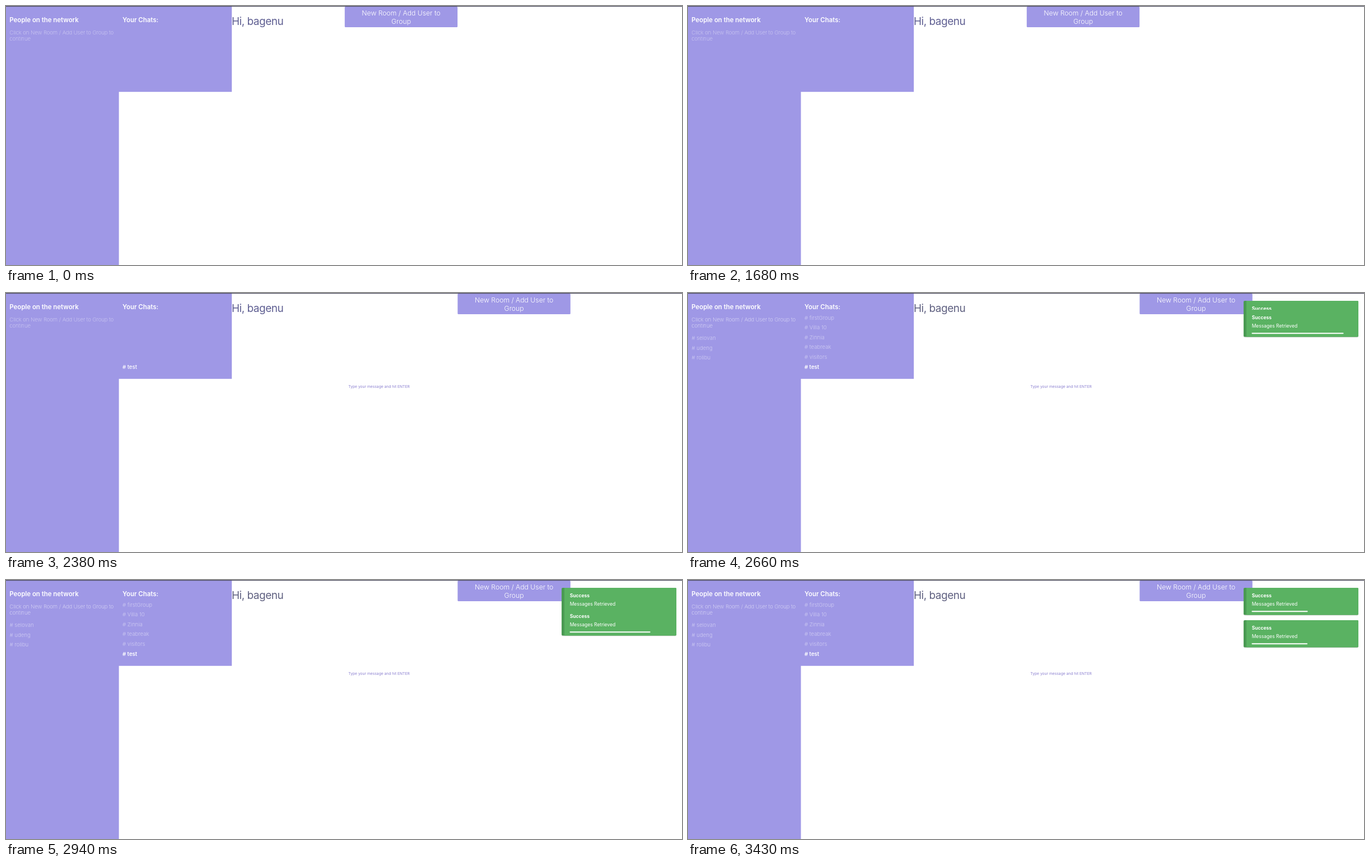
Animation of 1207 by 464 pixels, one loop 3.5 s. Source, as an HTML page:

```html
<!DOCTYPE html>
<html lang="en">
<head>
<meta charset="utf-8">
<title>Chat rooms</title>
<style>
  html, body { margin: 0; width: 100%; height: 100%; overflow: hidden; background: #fff; }
  svg { display: block; width: 1207px; height: 464px; }
  text { font-family: Inter, Roboto, sans-serif; fill: #fff; white-space: pre; }
  .head { font-size: 11.4px; font-weight: 600; }
  .hint { font-size: 9.5px; font-weight: 200; }
  .item { font-size: 9.6px; font-weight: 300; opacity: .5; }
  .room { font-size: 9.6px; }
  .hello { font-size: 19px; letter-spacing: -.5px; }
  .btn { font-size: 12.2px; font-weight: 300; text-anchor: middle; }
  .type { font-size: 6.72px; fill: #8c80d0; }
  .title { font-size: 8.5px; font-weight: 700; }
  .note { font-size: 8.5px; }
</style>
</head>
<body>
<svg id="stage" viewBox="0 0 1207 464" xmlns="http://www.w3.org/2000/svg"></svg>
<script>
const LOOP = 3500, STEP = 70;
const JOIN = 2240, LOADED = 2520;
const ROW = 17.6;
const stage = document.getElementById('stage');

function add(parent, tag, attrs, content) {
  const el = document.createElementNS(stage.namespaceURI, tag);
  for (const key in attrs) el.setAttribute(key, attrs[key]);
  if (content) el.textContent = content;
  parent.appendChild(el);
  return el;
}
const group = () => add(stage, 'g', {});
const rect = (parent, x, y, width, height, fill, rx = 0) =>
  add(parent, 'rect', { x, y, width, height, fill, rx });
const text = (parent, x, y, cls, content) =>
  add(parent, 'text', { x, y, class: cls }, content);

const panels = group();
rect(panels, 0, 0, 201.6, 464, '#9f98e6');
rect(panels, 201, 0, 202.2, 153.8, '#9f98e6');
text(stage, 6.3, 29, 'head', 'People on the network');
text(stage, 208, 29, 'head', 'Your Chats:');
const hint = group();
text(hint, 6.3, 51, 'hint', 'Click on New Room / Add User to Group to');
text(hint, 6.3, 62.3, 'hint', 'continue');
const hello = text(stage, 403, 34.3, 'hello', 'Hi, bagenu');

const lists = group();
['selovan', 'udeng', 'rolibu'].forEach((name, i) =>
  text(lists, 6.5, 84 + i * ROW, 'item', '# ' + name));
['firstGroup', 'Villa 10', 'Zinnia', 'teabreak', 'visitors'].forEach((name, i) =>
  text(lists, 208, 47.5 + i * ROW, 'item', '# ' + name));

const chat = group();
const room = text(chat, 208, 135.5, 'room', '# test');
text(chat, 611.3, 170.3, 'type', 'Type your message and hit ENTER');

const button = group();
rect(button, 604.8, 1, 201.4, 37, '#9f98e6', 1.5);
text(button, 705.5, 17.2, 'btn', 'New Room / Add User to');
text(button, 705.5, 32.3, 'btn', 'Group');

rect(stage, 0, 0, 1207, 1.2, '#4b4a5c');

function makeToast() {
  const box = group();
  rect(box, 992, 15.5, 205, 48.5, 'rgba(0,0,0,.08)', 2.5);
  rect(box, 992, 14.8, 205, 48.2, 'rgba(0,0,0,.12)', 2);
  rect(box, 992, 14, 205, 48.5, '#4a9a53', 2);
  add(box, 'path', { d: 'M997 14h198a2 2 0 0 1 2 2v44.5a2 2 0 0 1-2 2h-198z', fill: '#5ab262' });
  text(box, 1006.7, 31, 'title', 'Success');
  text(box, 1006.7, 46.2, 'note', 'Messages Retrieved');
  return { box, bar: rect(box, 1006.5, 55.3, 0, 1.9, '#fff', .8) };
}
const toasts = [makeToast(), makeToast()];

// Linear interpolation through [time, value] points.
function track(points, t) {
  let [t0, v0] = points[0];
  for (const [t1, v1] of points) {
    if (t <= t1) return t1 === t0 ? v1 : v0 + (v1 - v0) * (t - t0) / (t1 - t0);
    [t0, v0] = [t1, v1];
  }
  return v0;
}
const SLIDE = [[2520, 5.5], [2660, 16], [2940, 37], [3220, 58]];
const BAR = [[2520, 174], [2660, 164.5], [2940, 144.5], [3430, 100]];

const show = (el, on) => el.setAttribute('visibility', on ? 'visible' : 'hidden');

function draw(time) {
  const t = Math.floor((time % LOOP) / STEP) * STEP;
  const joined = t >= JOIN, loaded = t >= LOADED;
  show(chat, joined);
  show(lists, loaded);
  button.setAttribute('transform', `translate(${joined ? 201.6 : 0} 0)`);
  room.style.fontWeight = loaded ? 600 : 500;
  hint.style.opacity = loaded ? .75 : .6;
  hello.style.fill = loaded ? '#5f6080' : '#5f5f92';
  toasts.forEach(({ box, bar }, i) => {
    show(box, loaded);
    box.setAttribute('transform', `translate(0 ${i * track(SLIDE, t)})`);
    bar.setAttribute('width', track(BAR, t) - i * .5);
  });
}

const start = performance.now();
function tick() {
  draw(performance.now() - start);
  requestAnimationFrame(tick);
}
tick();
</script>
</body>
</html>
```
